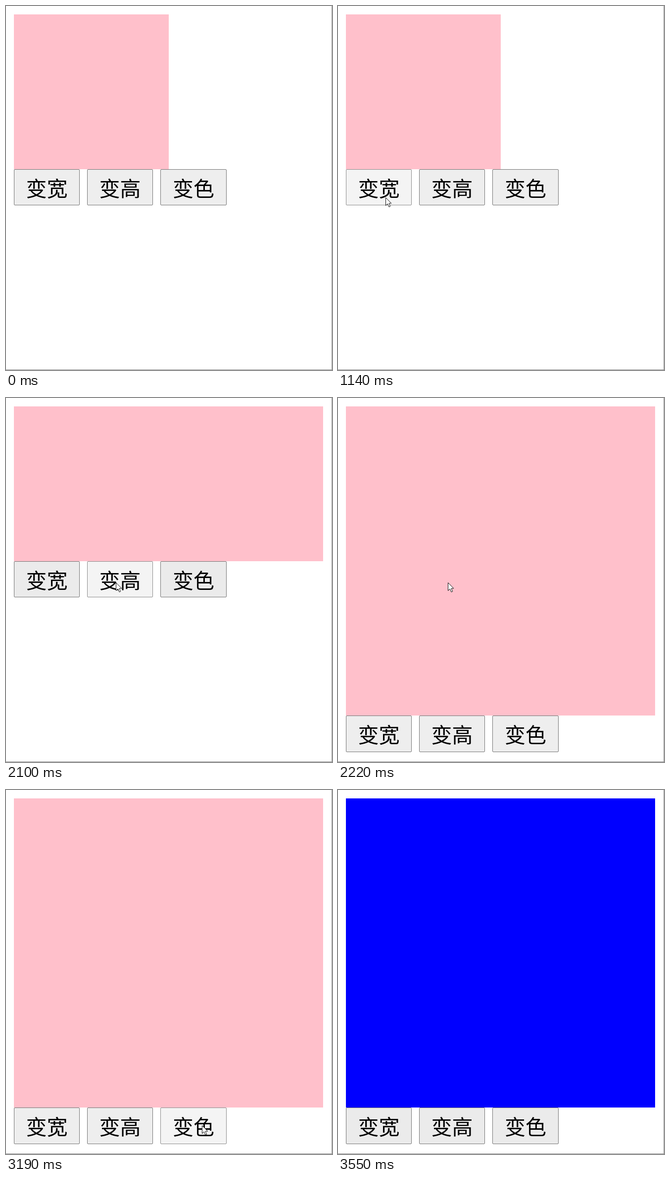
Recreate the animation shown at these times as an HTML page. Size 659x736 px, loop 4230 ms.

```html
<!DOCTYPE html>
<html lang="zh-CN">
<head>
<meta charset="utf-8">
<style>
  html, body { margin: 0; width: 100%; height: 100%; overflow: hidden; background: #fff; }
  svg { display: block; }
  text { font: 42px "Noto Sans CJK SC", "Noto Sans CJK", sans-serif; text-anchor: middle; }
</style>
</head>
<body>
<svg width="659" height="736" viewBox="0 0 659 736">
  <path d="M658.5 0V736" stroke="#a0a0a0"/>
  <path d="M0 735.5H659" stroke="#8c8c8c"/>
  <rect id="box" x="16" y="17"/>
  <g id="buttons"></g>
  <path id="cursor" d="M.5 .5V16.5L4.3 13L7 19.3L9.6 18.2L7 12H11.8Z" fill="#fff" stroke="#111"/>
</svg>
<script>
const LOOP = 4230, STEP = 60, PRESS = 120;
const WIDEN = 1260, HEIGHTEN = 2220, RECOLOUR = 3240, LEAVE = 3550;
const clicks = [WIDEN, HEIGHTEN, RECOLOUR];

const glide = u => { const v = u ** .8; return v * v * (3 - 2 * v); };
const settle = u => 1 - (1 - u) ** 3.3;

// The pointer travels from stop to stop in even time steps; bow bends the path downwards.
const entry = { x: 441, y: 739 };
const moves = [
  { start: 180, steps: 9, x: 99, y: 404, bow: 22, ease: glide },
  { start: 720, steps: 7, x: 96, y: 387, bow: 0, ease: settle },
  { start: 1570, steps: 8, x: 222, y: 373, bow: 12, ease: settle },
  { start: 2400, steps: 7, x: 396, y: 678, bow: 0, ease: glide },
  { start: 3490, steps: 1, x: 444, y: 684, bow: 0, ease: settle }
];

function set(node, attrs) {
  for (const key in attrs) node.setAttribute(key, attrs[key]);
}
function svgNode(name, attrs, parent) {
  const node = document.createElementNS("http://www.w3.org/2000/svg", name);
  set(node, attrs);
  return parent.appendChild(node);
}

const box = document.getElementById("box");
const cursor = document.getElementById("cursor");
const group = document.getElementById("buttons");
const buttons = ["变宽", "变高", "变色"].map((label, i) => {
  const left = Math.round(16 + 148.2 * i);
  const right = Math.round(149.2 + 148.2 * i);
  const rect = svgNode("rect", { x: left + .5, width: right - left - 1, rx: 1.5 }, group);
  const text = svgNode("text", { x: (left + right) / 2 }, group);
  text.textContent = label;
  return { rect, text, left, right };
});

function pointerAt(t) {
  if (t < moves[0].start || t >= LEAVE) return null;
  const index = moves.findLastIndex(move => move.start <= t);
  const move = moves[index], from = moves[index - 1] || entry;
  const step = Math.min(Math.floor((t - move.start) / STEP) + 1, move.steps);
  const p = move.ease(step / move.steps);
  return {
    x: Math.round(from.x + (move.x - from.x) * p),
    y: Math.round(from.y + (move.y - from.y) * p + move.bow * Math.sin(Math.PI * p))
  };
}

function draw(t) {
  const top = t >= HEIGHTEN ? 642 : 330;
  const bottom = t >= HEIGHTEN ? 716 : 403;
  set(box, {
    width: t >= WIDEN ? 625 : 313,
    height: top - 17,
    fill: t >= RECOLOUR ? "#00f" : "#ffc0cb"
  });

  const pointer = pointerAt(t);
  cursor.style.display = pointer ? "" : "none";
  if (pointer) set(cursor, { transform: `translate(${pointer.x} ${pointer.y})` });

  const dim = (t >= WIDEN && t < HEIGHTEN) || t >= RECOLOUR;
  buttons.forEach(({ rect, text, left, right }, i) => {
    const hover = pointer && pointer.x >= left && pointer.x < right &&
      pointer.y >= top && pointer.y < bottom;
    const pressed = t >= clicks[i] - PRESS && t < clicks[i];
    set(rect, {
      y: top + .5,
      height: bottom - top - 1,
      fill: pressed ? "#f4f4f4" : hover || dim ? "#ebebeb" : "#eee",
      stroke: pressed ? "#8d8d8d" : hover ? "#4f4f4f" : "#767676"
    });
    set(text, { y: top + 55 });
  });
}

function tick() {
  draw(performance.now() % LOOP);
  requestAnimationFrame(tick);
}
tick();
</script>
</body>
</html>
```
